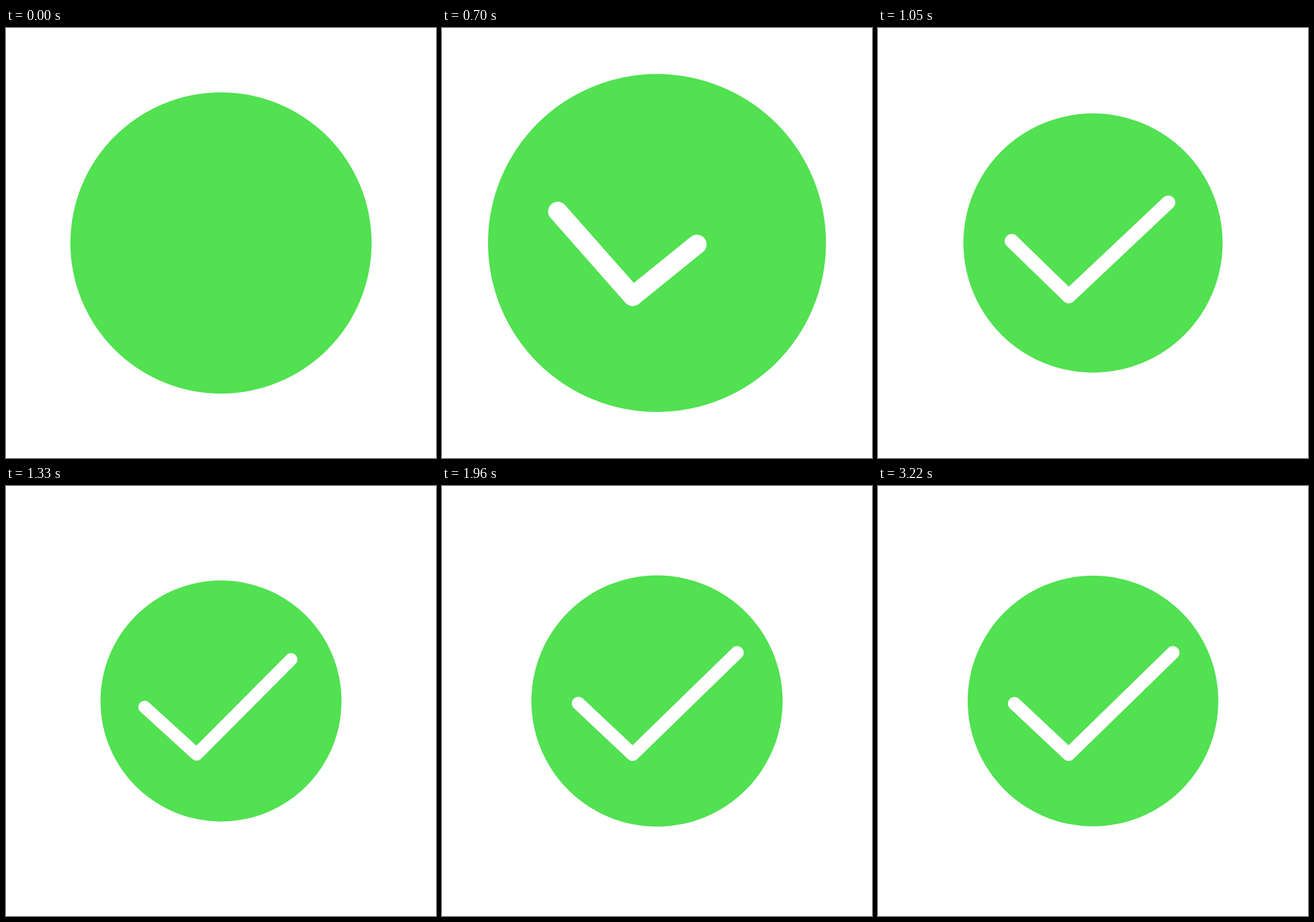
Recreate the animation shown at these times as an HTML page with a canvas. Size 748 px wide and 748 px high, loop 3.29 s.

```html
<!DOCTYPE html>
<html lang="en">
<head>
<meta charset="utf-8">
<title>Check mark</title>
<style>
html, body { margin: 0; width: 100%; height: 100%; overflow: hidden; background: #fff; }
canvas { display: block; width: 748px; height: 748px; }
</style>
</head>
<body>
<canvas id="stage" width="748" height="748"></canvas>
<script>
const ctx = document.getElementById('stage').getContext('2d');
const GREEN = '#51e151', MID = 374, LOOP = 3290, HOLD = 490, STEP = 70;

// Damped swing around the resting size
const swing = k => Math.exp(-0.217 * k) * (44 * Math.cos(0.29 * k) + 178.3 * Math.sin(0.29 * k));

function drawRays(k) {
  const inner = 371 - 22 * (9 - k);
  const outer = 371 - 3 * Math.max(0, 8 - k) ** 3;
  if (k >= 9 || outer <= inner) return;
  ctx.fillStyle = GREEN;
  for (let i = 0; i < 12; i++) {
    ctx.save();
    ctx.translate(MID, MID);
    ctx.rotate(i * Math.PI / 6);
    ctx.beginPath();
    ctx.roundRect(inner, -5, outer - inner, 10, 1.5);
    ctx.fill();
    ctx.restore();
  }
}

function drawDisc(k) {
  ctx.fillStyle = GREEN;
  ctx.beginPath();
  ctx.arc(MID, MID, 218 + swing(k), 0, 2 * Math.PI);
  ctx.fill();
}

function drawCheck(k) {
  const shown = 1 - Math.exp(-0.33 * (k - 1.3));
  if (shown <= 0) return;
  const s = swing(k - 0.35);
  const bx = 331.7, by = 466.8;
  const ax = 237.5 - 0.45 * s, ay = 378.5 - 0.74 * s;
  const cx = 513 + 1.43 * s, cy = 290 - 0.78 * s;
  const length = Math.hypot(bx - ax, by - ay) + Math.hypot(cx - bx, cy - by);
  ctx.strokeStyle = '#fff';
  ctx.lineWidth = 23 + 0.135 * s;
  ctx.lineCap = ctx.lineJoin = 'round';
  ctx.setLineDash([shown * length, 2 * length]);
  ctx.beginPath();
  ctx.moveTo(ax, ay);
  ctx.lineTo(bx, by);
  ctx.lineTo(cx, cy);
  ctx.stroke();
}

const start = performance.now();
function draw() {
  const t = (performance.now() - start) % LOOP;
  const k = t < HOLD ? 0 : Math.floor((t - HOLD) / STEP) + 1;
  ctx.fillStyle = '#fff';
  ctx.fillRect(0, 0, 748, 748);
  drawRays(k);
  drawDisc(k);
  drawCheck(k);
  requestAnimationFrame(draw);
}
draw();
</script>
</body>
</html>
```
